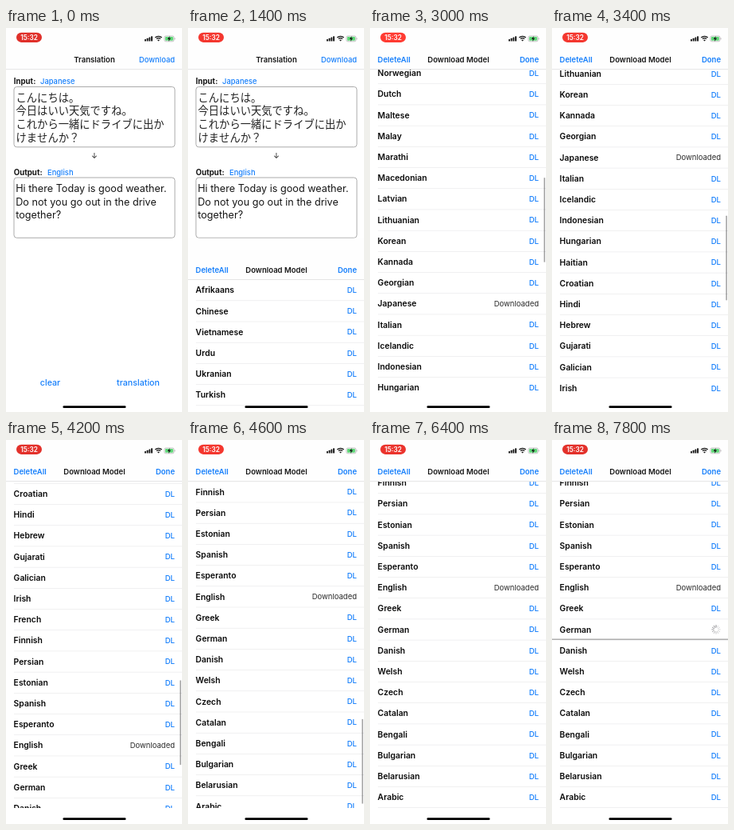
Recreate the animation shown at these times as an HTML page with a canvas. Size 221 px wide and 480 px high, loop 8000 ms.

```html
<!DOCTYPE html>
<html lang="en">
<head>
<meta charset="utf-8">
<title>Translation</title>
<style>
html, body { margin: 0; width: 100%; height: 100%; overflow: hidden; background: #fff; }
canvas { display: block; width: 221px; height: 480px; }
</style>
</head>
<body>
<canvas id="stage"></canvas>
<script>
const W = 221, H = 480, LOOP = 8000, STEP = 200;
const TOP = 52, BOTTOM = 460, ROW = 26.2, END = 1137.8;
const BLUE = '#147efb', FADED = '#a9d0fa', INK = '#161616';
const LATIN = 'Inter, "Open Sans", sans-serif';
const KANA = '"Noto Sans CJK JP", "Noto Sans CJK", sans-serif';
const LANGS = ('Afrikaans Chinese Vietnamese Urdu Ukranian Turkish Tagalog Thai Telugu Tamil ' +
  'Swahili Swedish Albanian Slovenian Slovak Russian Romanian Portuguese Polish Norwegian ' +
  'Dutch Maltese Malay Marathi Macedonian Latvian Lithuanian Korean Kannada Georgian ' +
  'Japanese Italian Icelandic Indonesian Hungarian Haitian Croatian Hindi Hebrew Gujarati ' +
  'Galician Irish French Finnish Persian Estonian Spanish Esperanto English Greek German ' +
  'Danish Welsh Czech Catalan Bengali Bulgarian Belarusian Arabic').split(' ');
const READY = ['Japanese', 'English'];
const BUSY = 'German', BUSY_AT = 6800;

const canvas = document.getElementById('stage');
const ctx = canvas.getContext('2d');
const dpr = window.devicePixelRatio || 1;
canvas.width = W * dpr;
canvas.height = H * dpr;

const clamp = v => Math.max(0, Math.min(1, v));
const span = (t, a, b) => clamp((t - a) / (b - a));
const easeOut = u => 1 - (1 - u) ** 3;

// y is the middle of the capitals
function text(str, x, y, size, { color = INK, weight = 400, align = 'left', family = LATIN } = {}) {
  ctx.font = `${weight} ${size}px ${family}`;
  ctx.fillStyle = color;
  ctx.textAlign = align;
  ctx.fillText(str, x, y + size * 0.36);
}

function rect(x, y, w, h, color) {
  ctx.fillStyle = color;
  ctx.fillRect(x, y, w, h);
}

function round(x, y, w, h, r, color, stroke) {
  ctx.beginPath();
  ctx.roundRect(x, y, w, h, r);
  if (stroke) {
    ctx.strokeStyle = color;
    ctx.lineWidth = stroke;
    ctx.stroke();
  } else {
    ctx.fillStyle = color;
    ctx.fill();
  }
}

function navBar(title) {
  rect(0, 0, W, TOP, '#fefefe');
  rect(0, TOP - 0.5, W, 0.6, '#d4d4d6');
  text(title, 111, 39.7, 9.55, { weight: 600, align: 'center' });
}

function statusBar(t) {
  const glow = (1 - Math.cos(t / 1000 * Math.PI)) / 2;
  round(13, 5.7, 32, 12.2, 6.1, `rgb(${224 + 31 * glow},${48 + 11 * glow},${42 + 8 * glow})`);
  text('15:32', 29, 12, 8.3, { color: '#fff', weight: 600, align: 'center' });

  for (let i = 0; i < 4; i++) {
    const h = 2.4 + i * 1.3;
    round(174 + i * 2.7, 16.5 - h, 1.9, h, 0.5, INK);
  }

  ctx.strokeStyle = INK;
  ctx.lineWidth = 1.3;
  for (const r of [3.6, 5.9]) {
    ctx.beginPath();
    ctx.arc(191.5, 16.2, r, Math.PI * 1.25, Math.PI * 1.75);
    ctx.stroke();
  }
  ctx.beginPath();
  ctx.moveTo(191.5, 16.6);
  ctx.arc(191.5, 16.6, 2, Math.PI * 1.25, Math.PI * 1.75);
  ctx.fillStyle = INK;
  ctx.fill();

  round(198.9, 10, 12, 6.8, 1.8, '#a8a8a8', 0.7);
  round(199.9, 11, 10, 4.8, 1, '#5fd878');
  round(211.5, 12.3, 0.9, 2.2, 0.4, '#a8a8a8');
  ctx.beginPath();
  [[205.7, 10], [202.7, 14], [204.6, 14], [204, 17], [207.1, 12.8], [205.2, 12.8]]
    .forEach(([x, y]) => ctx.lineTo(x, y));
  ctx.closePath();
  ctx.fillStyle = INK;
  ctx.fill();
}

function field(label, lang, x, y, h) {
  text(label, 9.7, y - 6.1, 9.7, { weight: 700 });
  text(lang, x, y - 6.1, 9.4, { color: BLUE, weight: 500 });
  round(10, y + 0.5, 202, h, 3.5, '#a2a2a2', 0.9);
}

function mainScreen(t) {
  rect(0, 0, W, H, '#fff');
  navBar('Translation');
  const pressed = t >= 1000 && t < 1400;
  text('Download', 212, 39.7, 9.4, { color: pressed ? FADED : BLUE, weight: 500, align: 'right' });

  field('Input:', 'Japanese', 43, 73, 75.3);
  ['こんにちは。', '今日はいい天気ですね。', 'これから一緒にドライブに出か', 'けませんか？']
    .forEach((line, i) => text(line, 12.5, 87 + i * 16.7, 13.3,
      { family: KANA, weight: 300, color: '#222' }));

  text('↓', 111, 160, 9.5, { align: 'center' });

  field('Output:', 'English', 52, 186.5, 75.3);
  ['Hi there Today is good weather.', 'Do not you go out in the drive', 'together?']
    .forEach((line, i) => text(line, 12.2, 200.4 + i * 16.6, 12.65));

  text('clear', 55.5, 443.5, 10.7, { color: BLUE, weight: 500, align: 'center' });
  text('translation', 166, 443.5, 10.7, { color: BLUE, weight: 500, align: 'center' });
}

// three flicks, the last one running into the end of the list
function scrollAt(t) {
  if (t < 2600) return 99 * span(t, 2450, 2600) ** 2;
  if (t < 3650) return 838 - 739 * Math.exp((2600 - t) / 500);
  if (t < 3800) return 747 + 8 * span(t, 3650, 3800);
  if (t < 4400) return 1092 - 337 * Math.exp((3800 - t) / 500);
  if (t < 4800) return 990 + 156 * easeOut(span(t, 4400, 4800));
  return END + 8 * Math.exp((4800 - t) / 200);
}

function spinner(x, y, t) {
  const head = Math.floor(t / 1000 * 12);
  ctx.lineWidth = 0.9;
  ctx.lineCap = 'round';
  for (let i = 0; i < 12; i++) {
    const a = i * Math.PI / 6, age = ((head - i) % 12 + 12) % 12;
    ctx.strokeStyle = `rgba(95,95,100,${Math.max(0.25, 0.85 - age * 0.07)})`;
    ctx.beginPath();
    ctx.moveTo(x + Math.cos(a) * 2.9, y + Math.sin(a) * 2.9);
    ctx.lineTo(x + Math.cos(a) * 5.3, y + Math.sin(a) * 5.3);
    ctx.stroke();
  }
  ctx.lineCap = 'butt';
}

function row(name, y, t) {
  const mid = y + 12.7;
  text(name, 9.6, mid, 10.4, { weight: 600, color: '#0a0a0a' });
  rect(10, y + ROW - 0.6, W - 10, 0.6, '#e6e6e8');

  if (READY.includes(name)) {
    text('Downloaded', 212, mid, 9.5, { color: '#2a2a2a', align: 'right' });
  } else if (name === BUSY && t >= BUSY_AT) {
    spinner(206, mid, t);
    rect(0, y + ROW - 1.9, W, 1.4, '#a8a8a8');
  } else {
    const pressed = name === BUSY && t >= BUSY_AT - STEP;
    text('DL', 212, mid, 9.6, { color: pressed ? FADED : BLUE, weight: 500, align: 'right' });
  }
}

function listScreen(t) {
  const scroll = scrollAt(t);
  rect(0, 0, W, H, '#fff');

  ctx.save();
  ctx.beginPath();
  ctx.rect(0, TOP, W, BOTTOM - TOP);
  ctx.clip();
  LANGS.forEach((name, i) => {
    const y = TOP + i * ROW - scroll;
    if (y > TOP - ROW && y < BOTTOM) row(name, y, t);
  });
  const shown = span(t, 2450, 2550) * (1 - span(t, 5400, 5700));
  if (shown > 0) {
    const y = 55 + Math.min(scroll, 1140) * 0.2607;
    round(218.3, y, 1.6, 106, 0.8, `rgba(0,0,0,${0.36 * shown})`);
  }
  ctx.restore();

  navBar('Download Model');
  text('DeleteAll', 9.6, 39.7, 9.5, { color: BLUE, weight: 600 });
  text('Done', 212, 39.7, 9.5, { color: BLUE, weight: 600, align: 'right' });
}

function draw(t) {
  ctx.setTransform(dpr, 0, 0, dpr, 0, 0);
  const slide = easeOut(span(t, 1300, 1850));
  if (slide < 1) mainScreen(t);
  if (slide > 0) {
    ctx.save();
    ctx.translate(0, H * (1 - slide));
    listScreen(t);
    ctx.restore();
  }
  statusBar(t);
  round(71.4, 472.3, 79.2, 2.7, 1.35, '#000');
}

const start = performance.now();
function tick() {
  const t = (performance.now() - start) % LOOP;
  draw(Math.floor(t / STEP) * STEP);
  requestAnimationFrame(tick);
}
tick();
</script>
</body>
</html>
```
